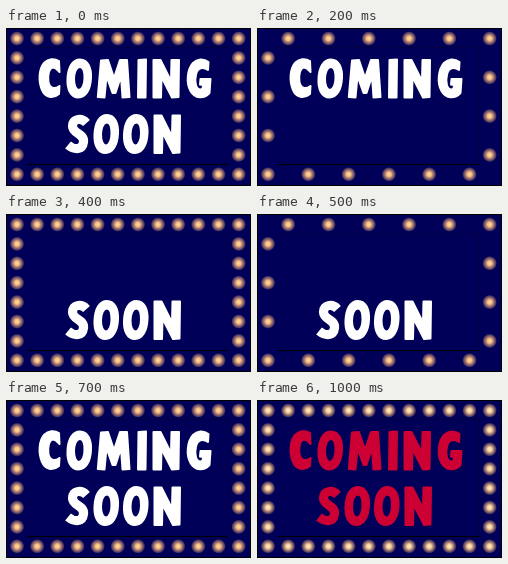
These frames come from a looping animation (245 by 158 pixels, 1.1 s). An HTML page:

```html
<!DOCTYPE html>
<html lang="en">
<head>
<meta charset="utf-8">
<title>Coming Soon</title>
<style>
  html, body { margin: 0; width: 100%; height: 100%; overflow: hidden; background: #000; }
  svg { display: block; width: 100vw; height: 100vh; }
  svg, .word, .bulbs { animation: 1100ms step-end infinite; }
  svg { animation-name: tint; }
  .word { fill: currentColor; stroke: currentColor; stroke-width: 2; stroke-linejoin: round; }
  .bulbs { fill: url(#glow); }
  #coming { animation-name: coming; }
  #soon { animation-name: soon; }
  #even { animation-name: even; }
  #odd { animation-name: odd; }

  /* Eleven steps of 100 ms; bulbs glow paler while the words are red */
  @keyframes tint {
    0%, 36.36%, 63.63% { color: #fff; --core: #ffe29a; --ring: #f4bd82; --halo: #a47476; }
    27.27%, 54.54%, 81.81%, 100% { color: #cc0033; --core: #fff4d0; --ring: #f6cf9c; --halo: #a88078; }
  }
  @keyframes coming {
    0%, 63.63%, 100% { visibility: visible; }
    36.36% { visibility: hidden; }
  }
  @keyframes soon {
    0%, 36.36%, 100% { visibility: visible; }
    9.09% { visibility: hidden; }
  }
  @keyframes even {
    0%, 27.27%, 54.54%, 81.81%, 100% { visibility: visible; }
    18.18%, 45.45%, 72.72% { visibility: hidden; }
  }
  @keyframes odd {
    0%, 36.36%, 63.63%, 90.9%, 100% { visibility: visible; }
    27.27%, 54.54%, 81.81% { visibility: hidden; }
  }
</style>
</head>
<body>
<svg viewBox="0 0 245 158" preserveAspectRatio="none" role="img" aria-label="COMING SOON">
  <defs>
    <radialGradient id="glow">
      <stop offset="0" stop-color="var(--core)"/>
      <stop offset=".3" stop-color="var(--ring)"/>
      <stop offset=".56" stop-color="var(--halo)"/>
      <stop offset=".82" stop-color="#54405f"/>
      <stop offset="1" stop-color="#000058"/>
    </radialGradient>
    <path id="o" fill-rule="evenodd" d="M74 31.500C82 31.500 85.500 40 85 50C84.500 62 79.500 69.500 72.500 69.500C64.500 69.500 61 61 61.500 51C62 39 66.500 31.500 74 31.500ZM74 39C70 39 68 45 68 51C68 57.500 70 62 72.800 62C76.500 62 78.500 56 78.500 50C78.500 44 77 39 74 39Z"/>
    <path id="n" d="M147.500 32L154.500 32L165 53L165.500 32L173 32L172.500 69L166 69.500L155.500 49L155 69.500L147.500 69.500Z"/>
  </defs>

  <rect width="245" height="158" fill="#000"/>
  <rect x="1" y="1" width="243" height="156" fill="#000058"/>
  <path d="M21 19.500H222.500V136" fill="none" stroke="#000044"/>
  <rect x="21" y="136" width="201" height="1" fill="#000"/>

  <g id="even" class="bulbs"></g>
  <g id="odd" class="bulbs"></g>

  <g id="coming" class="word">
    <path d="M53 33C48 30 42 31 38.500 34.500C33 40 32 53 36 62C39 70 47 71 53 66L53.500 58C48 62 43.500 60 42.500 54C41.500 47 43 40 47 39.500C50 39.500 51.500 42 53.500 44Z"/>
    <use href="#o"/>
    <path d="M95 32.500L102 32L108 50L114 32L121 32L123.500 69L116.500 69.500L115 48L109.500 65L106.500 65L100.500 48L98.500 69.500L91.800 69Z"/>
    <path d="M132.500 32L140 31.500L139.500 69.500L132 69.500Z"/>
    <use href="#n"/>
    <path d="M202.500 34C197 30 191 31 187 35C181 42 180 55 184.500 63C189 71 198 71 203.500 65L204.500 51L194.500 51L194 56.500L197 57C197 60.500 196 61.500 194.500 61.500C189.500 61.500 188.500 53 190 46.500C191.500 39.500 197 38.500 202 42Z"/>
  </g>

  <g id="soon" class="word">
    <path d="M80.500 95C75 89 66.500 91 66.500 98C66.500 106 78.500 105 77.500 114C76.500 122 69 122.500 62 117" fill="none" stroke-width="9.200"/>
    <use href="#o" x="27" y="55.500"/>
    <use href="#o" x="56.500" y="55.500"/>
    <use href="#n" x="1" y="55.500"/>
  </g>
</svg>
<script>
  const cols = 12, rows = 8;
  const groups = [document.getElementById("even"), document.getElementById("odd")];

  function addBulb(col, row) {
    const bulb = document.createElementNS("http://www.w3.org/2000/svg", "circle");
    bulb.setAttribute("cx", 11 + col * 20.15);
    bulb.setAttribute("cy", 10.5 + row * 19.4);
    bulb.setAttribute("r", 7.3);
    groups[(col + row) % 2].append(bulb);
  }

  for (let row = 0; row < rows; row++) {
    const step = row % (rows - 1) ? cols - 1 : 1;
    for (let col = 0; col < cols; col += step) addBulb(col, row);
  }
</script>
</body>
</html>
```
